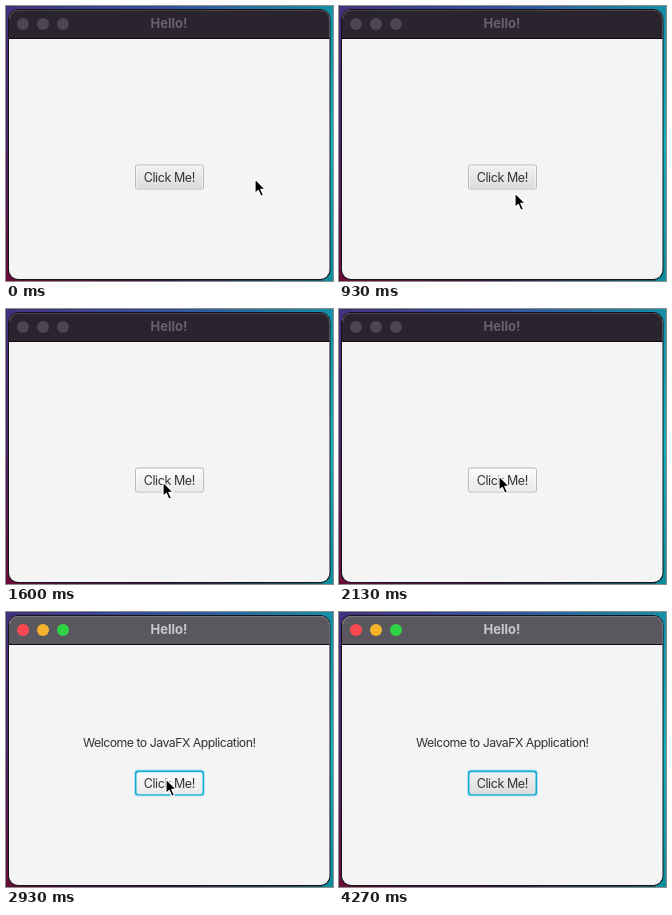
An HTML page that plays this animation: 327 by 275 pixels, repeating every 4390 ms.

```html
<!DOCTYPE html>
<html lang="en">
<head>
<meta charset="utf-8">
<title>Hello!</title>
<style>
html, body { margin: 0; width: 100%; height: 100%; overflow: hidden; background: #2d2550; }
svg { display: block; }
text { font-family: Inter, "Open Sans", sans-serif; text-anchor: middle; }
.title { font-size: 13px; font-weight: 700; }
.label { font-size: 12.3px; letter-spacing: -.5px; fill: #333; }
.button { font-size: 12.5px; letter-spacing: -.4px; fill: #333; }
</style>
</head>
<body>
<svg width="327" height="275" viewBox="0 0 327 275">
  <defs>
    <linearGradient id="top">
      <stop offset="0" stop-color="#43327f"/>
      <stop offset=".5" stop-color="#34529b"/>
      <stop offset="1" stop-color="#168da6"/>
    </linearGradient>
    <linearGradient id="left" x2="0" y2="1">
      <stop offset="0" stop-color="#43327f"/>
      <stop offset=".5" stop-color="#4a2468"/>
      <stop offset="1" stop-color="#680d36"/>
    </linearGradient>
    <linearGradient id="right" x2="0" y2="1">
      <stop offset="0" stop-color="#168da6"/>
      <stop offset=".5" stop-color="#12b3bd"/>
      <stop offset="1" stop-color="#0d8c9b"/>
    </linearGradient>
    <linearGradient id="bottom">
      <stop offset="0" stop-color="#680d36"/>
      <stop offset=".5" stop-color="#33203f"/>
      <stop offset="1" stop-color="#12626f"/>
    </linearGradient>
    <linearGradient id="face" x2="0" y2="1">
      <stop id="faceTop" offset="0"/>
      <stop id="faceEnd" offset="1"/>
    </linearGradient>
    <clipPath id="frame"><rect x="3" y="4" width="320.5" height="269" rx="9"/></clipPath>
  </defs>

  <rect width="327" height="275" fill="url(#bottom)"/>
  <rect width="327" height="10" fill="url(#top)"/>
  <rect width="10" height="275" fill="url(#left)"/>
  <rect x="317" width="10" height="275" fill="url(#right)"/>

  <rect x="2" y="3" width="322.5" height="271" rx="10" fill="#15121c"/>
  <g clip-path="url(#frame)">
    <rect x="3" y="4" width="321" height="270" fill="#f4f4f4"/>
    <rect id="bar" x="3" y="4" width="321" height="29"/>
    <rect x="3" y="32" width="321" height="1" fill="#0c0a0f"/>
  </g>
  <path id="edge" d="M4 13a8.5 8.5 0 0 1 8.500-8.500H314.500a8.500 8.500 0 0 1 8.500 8.500" fill="none"/>
  <circle class="light" cx="17" cy="18" r="6"/>
  <circle class="light" cx="37" cy="18" r="6"/>
  <circle class="light" cx="57" cy="18" r="6"/>
  <text id="title" class="title" x="163" y="22">Hello!</text>

  <text id="welcome" class="label" x="163.300" y="134.500">Welcome to JavaFX Application!</text>

  <rect id="glow" x="128" y="157.500" width="71" height="27" rx="4" fill="#039ed3" opacity=".25"/>
  <rect id="rim" x="129" y="158.500" width="69" height="25" rx="3"/>
  <rect id="inner" x="130" y="159.500" width="67" height="23" rx="2" fill="#fff"/>
  <rect x="130.500" y="160.300" width="66" height="22" rx="2" fill="url(#face)"/>
  <text class="button" x="163.300" y="175.500">Click Me!</text>

  <g id="cursor">
    <path d="M0 0V14.500L3.300 11.500L5.800 17.200L8.400 16L5.900 10.400H10.300Z"
      fill="#000" stroke="#fff" stroke-width="1.200" stroke-linejoin="round"/>
  </g>
</svg>
<script>
const LOOP = 4390;
const PRESS = 2270, RELEASE = 2930, HOVER = 1000, LEAVE = 3600;

// time, pointer tip x, y
const PATH = [
  [0, 249, 173], [800, 240, 176], [870, 211, 184], [930, 176, 187],
  [1000, 157, 184], [1200, 157, 183], [1270, 156, 181], [1400, 156, 178],
  [1470, 156, 176], [1530, 156, 174], [1600, 157, 173], [1730, 158, 172],
  [1930, 158, 170], [2000, 159, 168], [2130, 160, 167],
  [3530, 164, 178], [3600, 178, 208], [3670, 197, 243], [3730, 215, 285]
];
const FACES = {
  idle: ["#f1f1f1", "#dcdcdc"],
  hover: ["#fbfbfb", "#e9e9e9"],
  pressed: ["#dedede", "#cdcdcd"]
};
const LIGHTS = ["#fb494f", "#f5b22d", "#2fd444"];

const $ = id => document.getElementById(id);
const set = (id, name, value) => $(id).setAttribute(name, value);
const show = (id, on) => set(id, "visibility", on ? "visible" : "hidden");
const lights = document.querySelectorAll(".light");

function faceAt(t) {
  if (t >= PRESS && t < RELEASE) return FACES.pressed;
  return t >= HOVER && t < LEAVE ? FACES.hover : FACES.idle;
}

function draw(t) {
  const active = t >= PRESS;
  const [, x, y] = PATH.findLast(p => p[0] <= t);
  const [top, end] = faceAt(t);

  set("cursor", "transform", `translate(${x} ${y})`);
  set("bar", "fill", active ? "#5b575e" : "#29242e");
  set("edge", "stroke", active ? "#77737a" : "#46414b");
  set("title", "fill", active ? "#cac8cb" : "#67626b");
  lights.forEach((el, i) => el.setAttribute("fill", active ? LIGHTS[i] : "#4b464f"));
  set("faceTop", "stop-color", top);
  set("faceEnd", "stop-color", end);
  set("rim", "fill", active ? "#13aed8" : "#b9b9b9");
  show("inner", !active);
  show("glow", active);
  show("welcome", t >= RELEASE);
}

const start = performance.now();
function tick() {
  draw((performance.now() - start) % LOOP);
  requestAnimationFrame(tick);
}
tick();
</script>
</body>
</html>
```
